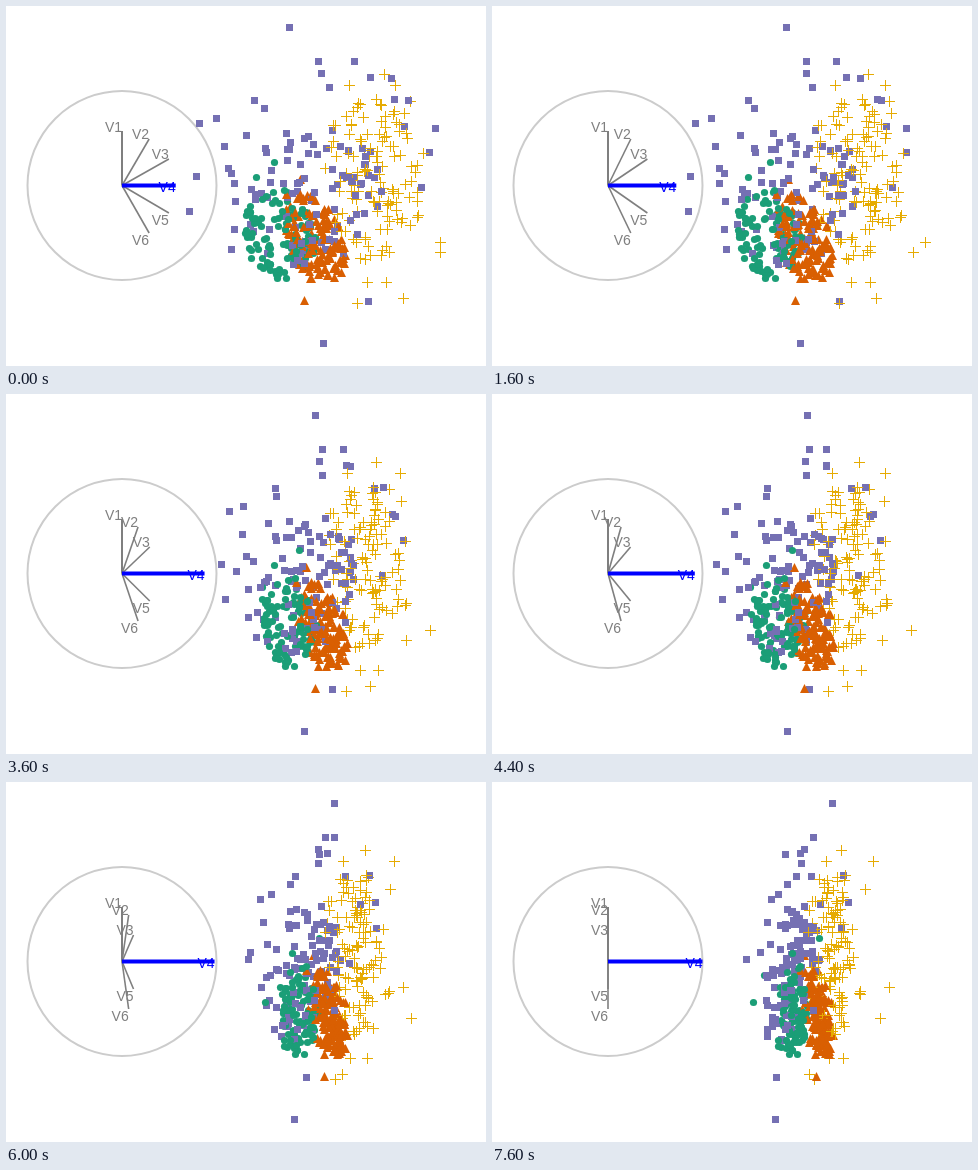
These frames come from a looping animation (480 px wide and 360 px high, 8000 ms). An HTML page with a canvas:

```html
<!DOCTYPE html>
<html>
<head>
<meta charset="utf-8">
<style>
html, body { margin: 0; width: 100%; height: 100%; overflow: hidden; background: #fff; }
canvas { display: block; }
</style>
</head>
<body>
<canvas id="stage" width="480" height="360"></canvas>
<script>
const ctx = document.getElementById('stage').getContext('2d');
const STEP = 400, STEPS = 20;
const START = Math.asin(54 / 95), END = Math.PI / 2;
const HUB = { x: 116, y: 179.5 }, MID = 319;

let seed = 41;
function rnd() {
  seed = (seed + 0x6D2B79F5) | 0;
  let t = Math.imul(seed ^ seed >>> 15, 1 | seed);
  t ^= t + Math.imul(t ^ t >>> 7, 61 | t);
  return ((t ^ t >>> 14) >>> 0) / 4294967296;
}

const marks = {
  square(x, y) { ctx.fillRect(x - 3, y - 3, 7, 7); },
  dot(x, y) {
    ctx.beginPath();
    ctx.arc(x + .5, y + .5, 3.6, 0, 7);
    ctx.fill();
  },
  triangle(x, y) {
    ctx.beginPath();
    ctx.moveTo(x + .5, y - 5);
    ctx.lineTo(x + 5, y + 4);
    ctx.lineTo(x - 4, y + 4);
    ctx.fill();
  },
  cross(x, y) {
    ctx.fillRect(x - 5, y, 11, 1);
    ctx.fillRect(x, y - 5, 1, 11);
  }
};

// Each group: a random core (centre, radius and tilt of the first x,
// the last x and y) plus outliers as [first x, last x, y].
const groups = [
  { mark: 'square', color: '#7570b3', n: 88, pow: .6,
    first: [308, 70, -12], last: [301, 32, -12], y: [185, 76],
    far: [
      [283, 340, 21], [312, 321, 55], [348, 321, 55], [315, 312, 67], [323, 309, 81],
      [364, 308, 71], [385, 293, 72], [248, 304, 94], [258, 295, 102], [402, 319, 94],
      [388, 351, 93], [193, 279, 117], [210, 286, 112], [190, 268, 170], [183, 282, 205],
      [218, 275, 140], [222, 278, 162], [225, 288, 167], [228, 254, 177], [225, 295, 243],
      [229, 275, 195], [228, 275, 223], [240, 300, 129], [317, 283, 337], [362, 284, 295],
      [429, 328, 122], [398, 356, 120], [423, 349, 146], [415, 320, 181]
    ] },
  { mark: 'cross', color: '#e6ab02', n: 118, pow: .65,
    first: [366, 48, 6], last: [341, 31, 6], y: [174, 84],
    far: [
      [434, 388, 236], [434, 343, 246], [397, 317, 292], [351, 322, 297], [380, 351, 276],
      [361, 337, 276], [378, 349, 68], [389, 381, 79], [343, 334, 79], [404, 345, 95],
      [398, 373, 107], [371, 397, 205], [396, 368, 212], [417, 360, 147]
    ] },
  { mark: 'triangle', color: '#d95f02', n: 135, pow: .55,
    first: [308, 30, 11], last: [326, 18, 6], y: [233, 45],
    far: [[298, 324, 295], [294, 312, 174], [280, 308, 189]] },
  { mark: 'dot', color: '#1b9e77', n: 108, pow: .5,
    first: [273, 36, 4], last: [302, 20, -2], y: [227, 46],
    far: [[268, 327, 156], [272, 261, 220], [256, 272, 193], [250, 300, 171]] }
];

function makePoint(g) {
  const a = rnd() * 2 * Math.PI, d = rnd() ** g.pow;
  const u = d * Math.cos(a), v = d * Math.sin(a);
  const w = .5 * u + .65 * (rnd() + rnd() - 1);
  const at = ([mid, size, tilt], s) => mid + size * s + tilt * v;
  return [at(g.first, u), at(g.last, w), g.y[0] + g.y[1] * v];
}

const points = groups.flatMap(g =>
  [...Array.from({ length: g.n }, () => makePoint(g)), ...g.far].map(([x0, x1, y]) => {
    const q = x1 - MID;
    const p = (x0 - MID - q * Math.sin(START)) / Math.cos(START);
    return { g, p, q, y, order: rnd() };
  })
).sort((a, b) => a.order - b.order);

function axis(name, x, y, base, color, width) {
  ctx.strokeStyle = ctx.fillStyle = color;
  ctx.lineWidth = width;
  ctx.beginPath();
  ctx.moveTo(HUB.x, HUB.y);
  ctx.lineTo(HUB.x + x, y);
  ctx.stroke();
  ctx.fillText(name, HUB.x + x, base);
}

function draw(step) {
  const angle = START + (END - START) * step / (STEPS - 1);
  const c = Math.cos(angle), s = Math.sin(angle);
  ctx.fillStyle = '#fff';
  ctx.fillRect(0, 0, 480, 360);

  ctx.strokeStyle = '#ccc';
  ctx.lineWidth = 2;
  ctx.beginPath();
  ctx.arc(HUB.x, HUB.y, 94.5, 0, 7);
  ctx.stroke();

  ctx.font = '14px "Liberation Sans", Arial, sans-serif';
  ctx.textAlign = 'right';
  const gray = '#7f7f7f';
  axis('V1', 0, 125, 126, gray, 2);
  axis('V2', 33 * c, 133, 133, gray, 1.6);
  axis('V3', 57 * c, 153, 153, gray, 1.6);
  axis('V5', 57 * c, 207, 219, gray, 1.6);
  axis('V6', 33 * c, 227, 239, gray, 1.6);
  axis('V4', 94.5 * s, 179.5, 186, '#00f', 4);

  for (const { g, p, q, y } of points) {
    ctx.fillStyle = g.color;
    marks[g.mark](Math.round(MID + p * c + q * s), Math.round(y));
  }
}

function tick() {
  draw(Math.floor(performance.now() / STEP) % STEPS);
  requestAnimationFrame(tick);
}
tick();
</script>
</body>
</html>
```
